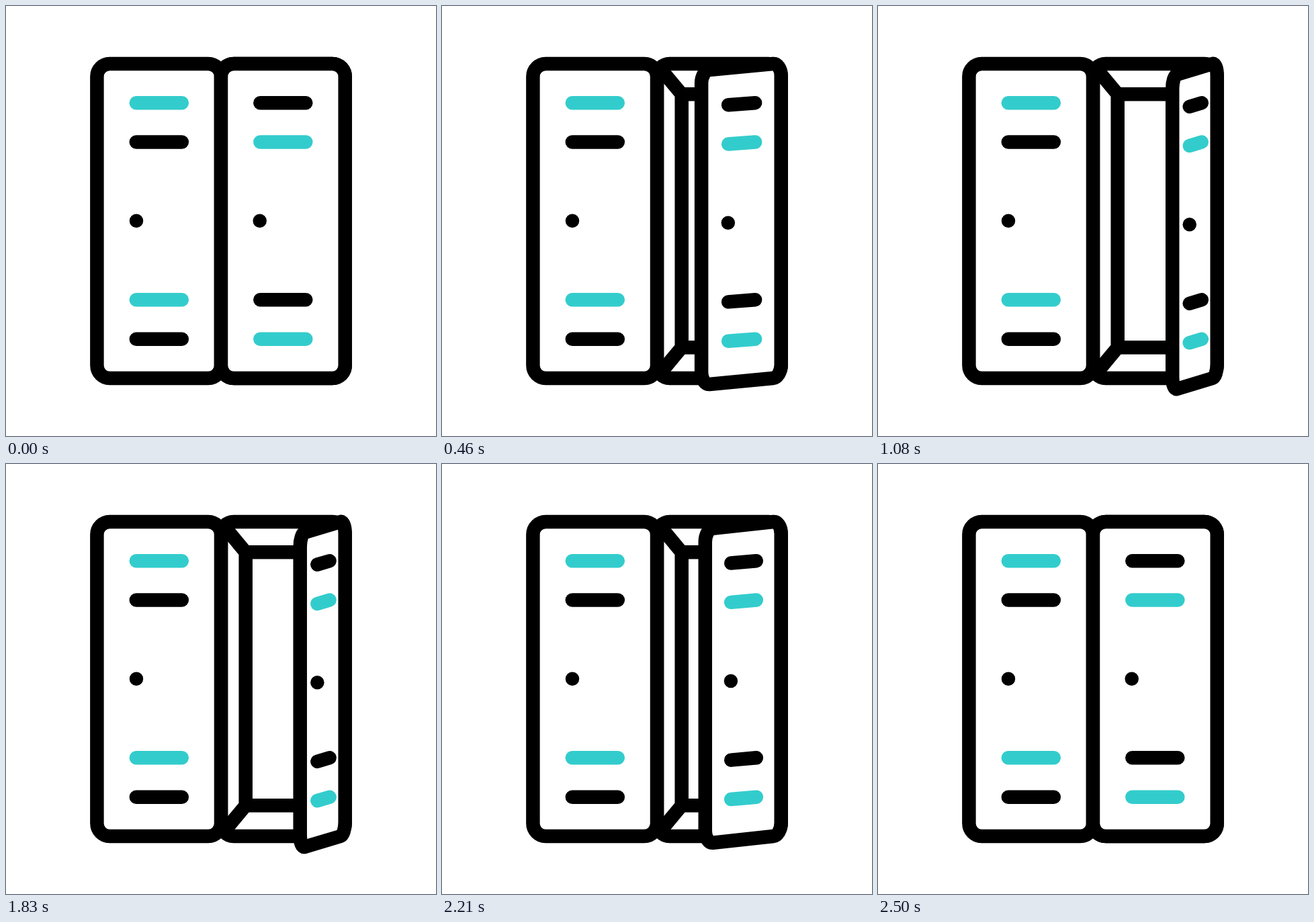
An HTML page that plays this animation: 640 px wide and 640 px high, repeating every 3000 ms.

```html
<!DOCTYPE html>
<html lang="en">
<head>
<meta charset="utf-8">
<title>Locker</title>
<style>
  html, body { margin: 0; width: 100%; height: 100%; overflow: hidden; background: #fff; }
  svg { display: block; width: 100vw; height: 100vh; }
  .ink { fill: none; stroke: #000; stroke-width: 20.5; stroke-linejoin: round; }
  .box { fill: #fff; }
  .bar { stroke-linecap: round; }
  .teal { stroke: #3cc; }
</style>
</head>
<body>
<svg viewBox="0 0 640 640">
  <rect class="ink box" x="320" y="86" width="184.7" height="468" rx="19"/>
  <path class="ink" d="M325.6 94L356.7 131.3V508.3L325.6 545.6M504 131.3H356.7M504 508.3H356.7"/>
  <rect class="ink box" x="135.4" y="86" width="184.6" height="468" rx="19"/>
  <g id="left"></g>
  <path id="door" class="ink box"/>
  <g id="right"></g>
</svg>
<script>
const LOOP = 3000, FPS = 24;
const LEFT = 320, RIGHT = 504.7, TOP = 86, BOTTOM = 554, RADIUS = 19;
const OPEN_X = 118.2;   // travel of the door's free edge
const OPEN_DROP = 16;   // how far its free corners sink
const BAR_Y = [144.2, 202.5, 437.3, 495.7];

const byId = id => document.getElementById(id);
const mix = (a, b, p) => a + (b - a) * p;

function add(parent, tag, attrs) {
  const el = document.createElementNS("http://www.w3.org/2000/svg", tag);
  for (const name in attrs) el.setAttribute(name, attrs[name]);
  return parent.appendChild(el);
}

// Four vents and a handle; tealParity picks which vents are coloured.
function addFittings(group, tealParity) {
  const bars = BAR_Y.map((y, i) =>
    add(group, "path", { class: "ink bar" + (i % 2 === tealParity ? " teal" : "") }));
  return { bars, knob: add(group, "circle", { r: 10.25 }) };
}

function placeFittings({ bars, knob }, x1, x2, knobX, drop) {
  bars.forEach((bar, i) =>
    bar.setAttribute("d", `M${x1} ${BAR_Y[i] + drop}L${x2} ${BAR_Y[i]}`));
  knob.setAttribute("cx", knobX);
  knob.setAttribute("cy", 319.7 + drop);
}

// Rounded rectangle, squeezed toward the hinge and sheared downward.
function doorPath(p) {
  const width = RIGHT - LEFT, k = RADIUS * 0.4477;
  const at = (x, y) => {
    const u = (RIGHT - x) / width;
    const shift = OPEN_DROP * p * (u * width - RADIUS) / (width - 2 * RADIUS);
    return `${(x + OPEN_X * p * u).toFixed(2)} ${(y + shift).toFixed(2)} `;
  };
  const corner = (x, y, sx, sy, fromSide) => {
    const pts = [at(x, y + sy * RADIUS), at(x, y + sy * k),
                 at(x + sx * k, y), at(x + sx * RADIUS, y)];
    const [a, b, c, d] = fromSide ? pts : pts.reverse();
    return `L${a}C${b}${c}${d}`;
  };
  return ("M" + (corner(LEFT, TOP, 1, 1, true) + corner(RIGHT, TOP, -1, 1, false) +
    corner(RIGHT, BOTTOM, -1, -1, true) + corner(LEFT, BOTTOM, 1, -1, false)).slice(1)) + "Z";
}

// Slow start, brisk finish: cubic-bezier(.43, 0, .77, .67).
function easeIn(v) {
  if (v <= 0) return 0;
  if (v >= 1) return 1;
  const bezier = (s, a, b) => 3 * (1 - s) * (1 - s) * s * a + 3 * (1 - s) * s * s * b + s * s * s;
  let lo = 0, hi = 1;
  for (let i = 0; i < 30; i++) {
    const mid = (lo + hi) / 2;
    if (bezier(mid, 0.43, 0.77) < v) lo = mid; else hi = mid;
  }
  return bezier(lo, 0, 0.67);
}

function openness(t) {
  const step = Math.floor((t + 4) * FPS / 1000);
  return step < 43 ? 1 - easeIn((26 - step) / 24) : 1 - easeIn((step - 43) / 17);
}

const leftFittings = addFittings(byId("left"), 0);
const rightFittings = addFittings(byId("right"), 1);
placeFittings(leftFittings, 193.8, 261.8, 194, 0);

function render(t) {
  const p = openness(t % LOOP);
  byId("door").setAttribute("d", doorPath(p));
  placeFittings(rightFittings, mix(378.3, 463.7, p), mix(446.3, 481.8, p),
    mix(377.7, 463.7, p), 5.5 * p);
}

let start;
function tick(now) {
  start ??= now;
  render(now - start);
  requestAnimationFrame(tick);
}
render(0);
requestAnimationFrame(tick);
</script>
</body>
</html>
```
